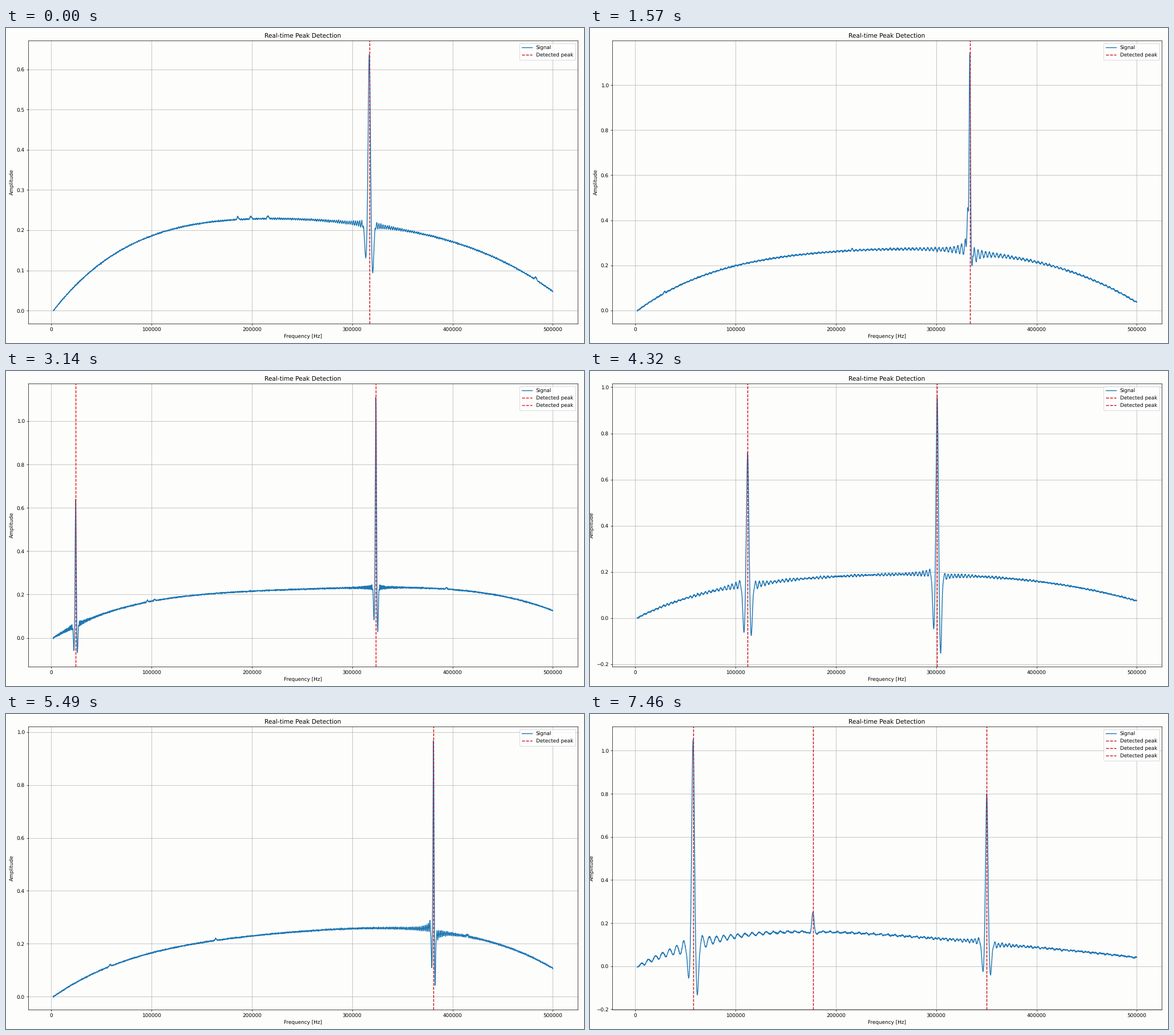
Recreate the animation shown at these times as a matplotlib script. Size 1013x553 px, loop 8000 ms.

```python
import numpy as np
import matplotlib.pyplot as plt
from matplotlib.animation import FuncAnimation

plt.rcParams.update({
    "font.family": "DejaVu Sans",
    "text.hinting": "none",
    "lines.linewidth": 1.6,
    "lines.scale_dashes": False,
    "lines.dashed_pattern": [5.55, 2.4],
})

WIDTH, HEIGHT, DPI = 1013, 553, 64
LOOP_MS, STEP_MS = 8000, 50
LEFT, RIGHT, TOP, BOTTOM = 39.1, 1002.1, 22.1, 519.1
PAPER, DARK_RED, BRIGHT_RED = "#fdfdfc", "#cc0c10", "#ec0c10"
KHZ = np.arange(2, 500.05, 0.1)


def bell(d, width):
    return np.exp(-(d / width) ** 2)


class Peak:
    """A resonance with a dip on each side and ringing that dies away.

    top, left and right are the levels reached at the centre and at the
    distance size before and after it.
    """

    def __init__(self, centre, size, top, left, right, ring, period, tail=0):
        self.centre, self.size = centre, size
        self.top, self.left, self.right = top, left, right
        self.ring, self.period, self.tail = ring, period, tail

    def response(self, x, base):
        d, s = x - self.centre, self.size
        shape = ((self.top - base) * bell(d, 0.43 * s)
                 + (self.left - base) * bell(d + s, 0.45 * s)
                 + (self.right - base) * bell(d - s, 0.45 * s))
        dist = np.maximum(np.abs(d), s)
        wave = np.cos(2 * np.pi * (dist - 2.2 * s) / self.period)
        ringing = self.ring * (10 / dist) ** 0.8 * wave
        drift = -self.tail * 10 / dist * np.sign(d)
        fade = np.clip((dist / s - 1.5) / 0.6, 0, 1) * np.clip(x / 8, 0, 1)
        return shape + fade * (ringing + drift)


class Scan:
    """One sweep: levels are the background at each 100 kHz."""

    def __init__(self, start, colour, levels, peaks, blips=()):
        self.start, self.colour, self.levels = start, colour, levels
        self.peaks, self.blips = peaks, blips

    def limits(self):
        lo = min([self.levels[0]] + [min(p.left, p.right) for p in self.peaks])
        hi = max(p.top for p in self.peaks)
        margin = 0.05 * (hi - lo)
        return lo - margin, hi + margin

    def signal(self, seed):
        nodes = np.array([2, 100, 200, 300, 400, 500])
        background = np.polynomial.Polynomial.fit(nodes, self.levels, 5)
        lo, hi = self.limits()
        noise = np.random.default_rng(seed).normal(0, 0.001 * (hi - lo), KHZ.size)
        y = background(KHZ) + noise
        y += sum(0.007 * bell(KHZ - c, 1) for c in self.blips)
        return y + sum(p.response(KHZ, background(p.centre)) for p in self.peaks)


SCANS = [
    Scan(0, DARK_RED, [-.0006, .186, .228, .218, .171, .0475],
         [Peak(317, 3.4, .6396, .129, .0935, .0065, 2.1)],
         blips=(186, 199, 216, 483)),
    Scan(780, BRIGHT_RED, [.002, .053, .07, .077, .095, .153],
         [Peak(49.4, 3.2, .763, -.074, -.0926, .006, 1.2),
          Peak(203.3, 4.2, .59, -.014, -.031, .010, 4, .009),
          Peak(392.1, 1.8, .43, .095, -.014, .010, 3.6, .008)]),
    Scan(1570, DARK_RED, [-.0015, .198, .261, .269, .216, .036],
         [Peak(333.5, 2.05, 1.14, .45, .195, .019, 3.75, .008)],
         blips=(29, 216)),
    Scan(2750, BRIGHT_RED, [0, .169, .2155, .231, .223, .126],
         [Peak(24.3, 1.7, .64, -.055, -.0733, .006, 1),
          Peak(323.6, 1.8, 1.1135, .08, .025, .006, 1)],
         blips=(95.7, 103, 394)),
    Scan(3530, DARK_RED, [0, .135, .18, .188, .16, .075],
         [Peak(112, 3.6, .72, -.06, -.08, .014, 3.8, .006),
          Peak(301, 3.4, .96, -.05, -.155, .012, 3.4, .006)]),
    Scan(4710, BRIGHT_RED, [-.0002, .188, .234, .217, .179, .095],
         [Peak(73.5, 1.9, .535, .24, .012, .016, 4.5, .008),
          Peak(336.2, 2.5, .6547, .134, .118, .004, 1.3)],
         blips=(181, 290, 456)),
    Scan(5490, DARK_RED, [-.0008, .165, .229, .2563, .239, .1077],
         [Peak(381, 1.6, .9722, .105, .04, .009, 1.55, .006)],
         blips=(58.7, 164, 414.8)),
    Scan(7060, DARK_RED, [-.002, .139, .157, .1275, .088, .04],
         [Peak(57.6, 4.2, 1.0517, -.052, -.142, .030, 7.1),
          Peak(177.1, 3.5, .252, .147, .145, .002, 7),
          Peak(350.4, 3.7, .8, -.025, -.04, .011, 3.6, .006)]),
]

fig = plt.figure(figsize=(WIDTH / DPI, HEIGHT / DPI), dpi=DPI, facecolor=PAPER)
BOX = [LEFT / WIDTH, 1 - BOTTOM / HEIGHT,
       (RIGHT - LEFT) / WIDTH, (BOTTOM - TOP) / HEIGHT]


def build_axes(index, scan):
    ax = fig.add_axes(BOX, label=f"scan {index}", facecolor=PAPER)
    ax.plot(KHZ * 1000, scan.signal(index), label="Signal")
    for peak in scan.peaks:
        ax.axvline(peak.centre * 1000, color=scan.colour, linestyle="--",
                   label="Detected peak")
    ax.set(title="Real-time Peak Detection", xlabel="Frequency [Hz]",
           ylabel="Amplitude", xlim=(-22900, 524900), ylim=scan.limits())
    ax.grid(True)
    ax.legend(loc="upper right")
    return ax


panels = [build_axes(i, scan) for i, scan in enumerate(SCANS)]


def update(frame):
    end = (frame + 1) * STEP_MS
    current = sum(scan.start < end for scan in SCANS) - 1
    for i, ax in enumerate(panels):
        ax.set_visible(i == current)
    return panels


anim = FuncAnimation(fig, update, frames=LOOP_MS // STEP_MS, interval=STEP_MS,
                     repeat=True, repeat_delay=0, blit=False)
plt.show()
```
